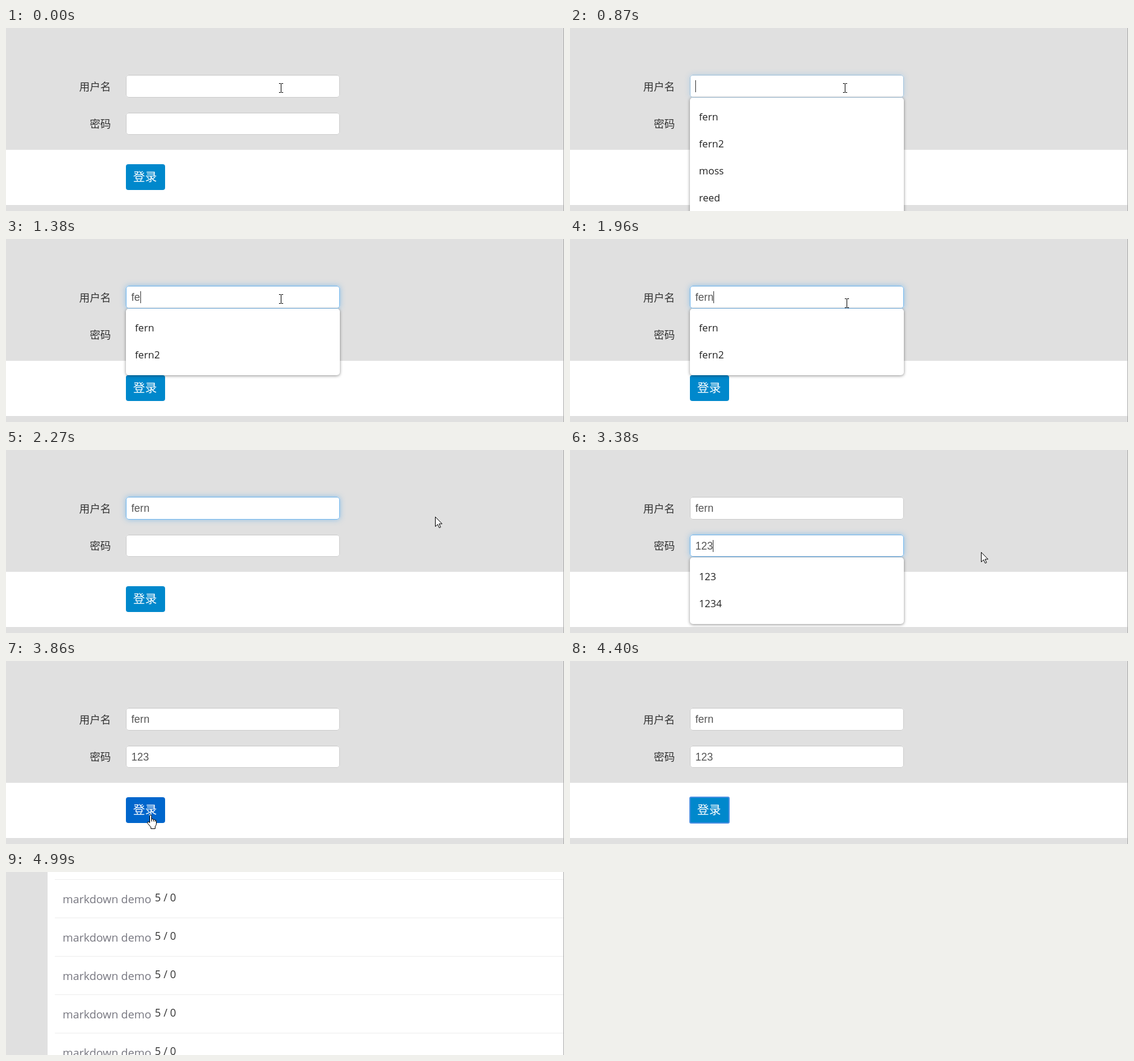
An HTML page with a canvas that plays this animation: 926x305 px, repeating every 5700 ms.

```html
<!DOCTYPE html>
<html lang="zh">
<head>
<meta charset="utf-8">
<style>
  html, body { margin: 0; height: 100%; overflow: hidden; background: #e0e0e0; }
  canvas { display: block; }
</style>
</head>
<body>
<canvas id="stage" width="926" height="305"></canvas>
<script>
const ctx = document.getElementById('stage').getContext('2d');
const LOOP = 5700;
const ARIAL = '17.5px "Liberation Sans", Arial, sans-serif';
const cjk = size => `${size}px "Noto Sans CJK SC", "Noto Sans CJK", sans-serif`;
const ui = size => `${size}px "Open Sans", "Noto Sans", sans-serif`;

const names = ['fern', 'fern2', 'moss', 'reed'];
const codes = ['123', '1234'];
const start = {
  user: '', code: '', userGlow: 0, codeGlow: 0, caret: '', menu: null, menuY: 116,
  pointer: ['beam', 456, 100], button: '#0088cc', pressed: false, list: false
};

// Each step changes only the listed parts of the state.
const steps = [
  [870, { userGlow: .5, caret: 'user', menu: names }],
  [990, { userGlow: 1 }],
  [1140, { user: 'f' }],
  [1260, { menu: names.slice(0, 2) }],
  [1380, { user: 'fe' }],
  [1810, { user: 'fer' }],
  [1960, { user: 'fern', pointer: ['beam', 459, 107] }],
  [2110, { pointer: ['arrow', 695, 112] }],
  [2270, { menu: null, caret: '', pointer: ['arrow', 712, 111] }],
  [2410, { userGlow: .5, pointer: ['arrow', 600, 132] }],
  [2530, { userGlow: 0, pointer: ['beam', 460, 156] }],
  [2690, { pointer: ['beam', 445, 155] }],
  [2830, { codeGlow: .12, caret: 'code', menu: codes, menuY: 179 }],
  [2950, { codeGlow: 1, code: '1' }],
  [3110, { code: '12', pointer: ['beam', 469, 161] }],
  [3260, { code: '123' }],
  [3380, { pointer: ['arrow', 682, 170] }],
  [3500, { menu: null, caret: '' }],
  [3620, { codeGlow: .5, pointer: ['arrow', 470, 210] }],
  [3740, { codeGlow: 0, pointer: ['hand', 234, 256] }],
  [3860, { button: '#0066cc' }],
  [3980, { button: '#0044cc' }],
  [4130, { pressed: true }],
  [4280, { button: '#0066cc', pointer: ['arrow', 762, 278] }],
  [4400, { button: '#0088cc', pointer: null }],
  [4990, { list: true }]
];

const arrow = new Path2D('M.5 .5V16.5L4.3 13L7 18.7L9.3 17.6L6.7 12H11.7Z');
const hand = new Path2D('M4.5 13V2.5Q4.5 .5 6 .5T7.5 2.5V7.5Q9.8 6.5 10.5 8.3Q12.6 7.6 13.3 9.2' +
  'Q15.5 8.8 15.5 11V15Q15.5 18 13.5 20V23.5H6.5V21L1 14.5Q.2 12.8 1.5 12Q3 11.5 4.5 13.5Z' +
  'M7.5 7.5V11.5M10.5 8.3V11.5M13.3 9.2V12');
const beam = new Path2D('M-3 -7.5H0M1 -7.5H4M.5 -7V7M-3 7.5H0M1 7.5H4');

function rect(x, y, w, h, color) {
  ctx.fillStyle = color;
  ctx.fillRect(x, y, w, h);
}

function text(str, x, y, font, color, align = 'left') {
  ctx.font = font;
  ctx.fillStyle = color;
  ctx.textAlign = align;
  ctx.fillText(str, x, y);
}

function round(x, y, w, h, r) {
  ctx.beginPath();
  ctx.roundRect(x, y, w, h, r);
}

function shadowFill(color, blur, dy) {
  ctx.save();
  ctx.shadowColor = color;
  ctx.shadowBlur = blur;
  ctx.shadowOffsetY = dy;
  ctx.fillStyle = '#fff';
  ctx.fill();
  ctx.restore();
}

function field(y, h, value, glow, caret) {
  round(199, y, 355, h, 5);
  shadowFill(`rgba(82,168,236,${.6 * glow})`, 10, 0);
  rect(202, y + 1, 349, 1, 'rgba(0,0,0,.06)');
  round(199.5, y + .5, 354, h - 1, 4.5);
  const mix = (a, b) => Math.round(a + (b - a) * glow);
  ctx.strokeStyle = `rgb(${mix(204, 117)},${mix(204, 185)},${mix(204, 240)})`;
  ctx.stroke();
  text(value, 208, y + 25, ARIAL, '#555');
  if (caret) rect(Math.round(208 + ctx.measureText(value).width), y + 9, 1, 20, '#333');
}

function drawMenu(items, y) {
  round(199, y, 355, 21 + 45 * items.length, 5);
  shadowFill('rgba(0,0,0,.45)', 5, 1);
  items.forEach((item, i) => text(item, 214, y + 38 + 45 * i, ui(16.6), '#222'));
}

function drawPointer([kind, x, y]) {
  const shape = { arrow, hand, beam }[kind];
  ctx.save();
  ctx.translate(x, y);
  ctx.fillStyle = '#fff';
  ctx.strokeStyle = '#000';
  if (kind !== 'beam') ctx.fill(shape);
  ctx.stroke(shape);
  ctx.restore();
}

function drawForm(s) {
  rect(0, 203, 926, 92, '#fff');
  text('用户名', 174, 104, cjk(17.5), '#333', 'right');
  text('密码', 174, 166, cjk(17.5), '#333', 'right');
  field(78, 38, s.user, s.userGlow, s.caret === 'user');
  field(141, 37, s.code, s.codeGlow, s.caret === 'code');

  round(199, 227, 65, 43, 4);
  ctx.fillStyle = s.button;
  ctx.fill();
  if (s.pressed) {
    round(199, 227, 65, 43, 2);
    ctx.lineWidth = 2;
    ctx.strokeStyle = '#4a90e2';
    ctx.stroke();
    ctx.lineWidth = 1;
  }
  text('登录', 211, 255, cjk(19.7), '#fff');

  if (s.menu) drawMenu(s.menu, s.menuY);
  if (s.pointer) drawPointer(s.pointer);
}

function drawList() {
  rect(69, 0, 857, 305, '#fff');
  for (let y = 12; y < 305; y += 64) {
    rect(81, y, 845, 1, '#eee');
    text('markdown demo', 94, y + 40, ui(18.5), '#777780');
    text('5 / 0', 247, y + 37, ui(17.4), '#333');
  }
}

function draw(now) {
  const t = now % LOOP;
  const s = Object.assign({}, start, ...steps.filter(([at]) => at <= t).map(([, change]) => change));
  rect(0, 0, 926, 305, '#e0e0e0');
  if (s.list) drawList();
  else drawForm(s);
  rect(925, 0, 1, 305, '#aaa');
  requestAnimationFrame(draw);
}
requestAnimationFrame(draw);
</script>
</body>
</html>
```
